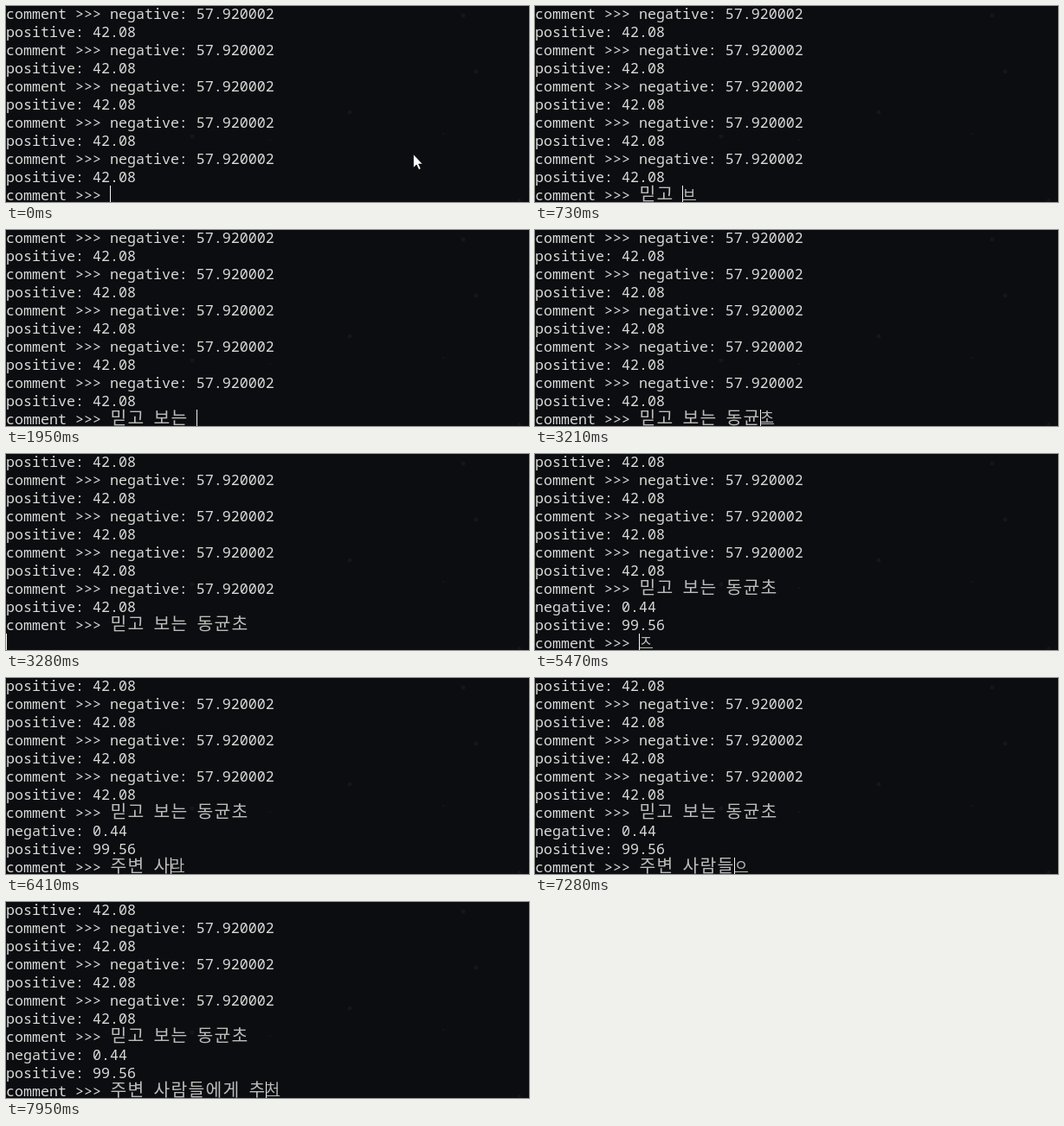
Write an HTML page that moves like this. It is 604 px wide and 227 px high and loops after 8 s.

```html
<!DOCTYPE html>
<html lang="ko">
<head>
<meta charset="utf-8">
<title>Terminal</title>
<style>
  html, body { margin: 0; width: 100%; height: 100%; overflow: hidden; background: #0c0d11; }
  svg { display: block; }
  text { white-space: pre; }
  .mono { font: 500 16.667px "Noto Sans Mono", "DejaVu Sans Mono", monospace; fill: #dadad8; }
  .wide, .draft { font-family: "Noto Sans CJK KR", "Noto Sans CJK", sans-serif; font-weight: 300; text-anchor: middle; fill: #bcbcba; }
  .wide { font-size: 20.4px; }
  .draft { font-size: 17.4px; }
</style>
</head>
<body>
<svg width="604" height="227" viewBox="0 0 604 227">
  <rect width="604" height="227" fill="#0c0d11"/>
  <rect y="226" width="604" height="1" fill="#190a19"/>
  <g id="specks" fill="#15161a"></g>
  <g id="rows"></g>
  <g id="input"></g>
  <rect id="caret" y="208" width="1" height="19" fill="#f4f4f4"/>
  <path id="mouse" d="M470.5 171.7v15.6l3.6-3.4 2.7 5.6 2.3-1.1-2.6-5.4h4.6z" fill="#fff" stroke="#000" stroke-width=".6"/>
</svg>
<script>
const LOOP = 8000, CELL = 10, LINE = 21, BASE = 15;
const PROMPT = 'comment >>> ', OLD = PROMPT + 'negative: 57.920002', POS = 'positive: 42.08';
const REVIEW = '믿고 보는 동균초';
const $ = id => document.getElementById(id);
const isWide = c => c > '\u1100';
const cols = s => [...s].reduce((n, c) => n + (isWide(c) ? 2 : 1), 0);

function add(parent, name, attrs, content = '') {
  const el = document.createElementNS('http://www.w3.org/2000/svg', name);
  for (const k in attrs) el.setAttribute(k, attrs[k]);
  el.textContent = content;
  parent.append(el);
}

// Lays a line on the character grid; Hangul takes two cells.
function put(parent, str, row, col = 0) {
  const y = BASE + row * LINE;
  for (const run of str.match(/[\u1100-\uffff]|[^\u1100-\uffff]+/g) || []) {
    if (isWide(run)) add(parent, 'text', { class: 'wide', x: (col + 1) * CELL, y: y - 0.5 }, run);
    else add(parent, 'text', { class: 'mono', x: col * CELL, y }, run);
    col += cols(run);
  }
}

const pairs = (n, a, b) => Array.from({ length: n }, (_, i) => i % 2 ? b : a);
const SCREENS = {
  first: pairs(10, OLD, POS),
  sent: [...pairs(9, POS, OLD), PROMPT + REVIEW],
  result: [...pairs(7, POS, OLD), PROMPT + REVIEW, 'negative: 0.44', 'positive: 99.56']
};

// Each step is "committed|composing", spread evenly from start to end.
const states = [{ t: 0, screen: 'first', prompt: PROMPT, typed: '|', mouse: true }];
function type(screen, start, end, steps, prompt = PROMPT) {
  steps.forEach((typed, i) => states.push({
    t: start + (end - start) * i / Math.max(1, steps.length - 1), screen, prompt, typed
  }));
}
type('first', 70, 860, ['|', '|ㅁ', '|미', '|믿', '믿|ㄱ', '믿|고', '믿고 |', '믿고 |ㅂ', '믿고 |보', '믿고 |본']);
type('first', 930, 1000, ['믿고 보|느', '믿고 보는 |']);
type('first', 1140, 1950, ['믿고 보는 |ㄷ', '믿고 보는 |']);
type('first', 2550, 2890, ['믿고 보는 |ㄷ', '믿고 보는 |도', '믿고 보는 |동', '믿고 보는 동|ㄱ', '믿고 보는 동|규']);
type('first', 3080, 3210, ['믿고 보는 동|균', '믿고 보는 동균|ㅊ', '믿고 보는 동균|초']);
type('sent', 3280, 3280, ['|'], '');
type('result', 4210, 4210, ['|'], '');
type('result', 4280, 4280, ['|']);
type('result', 5470, 5870, ['|ㅈ', '|주', '|줍', '주|벼', '주|변']);
type('result', 6010, 6410, ['주변 |', '주변 |ㅅ', '주변 |사', '주변 |살', '주변 사|라']);
type('result', 6870, 7480, ['주변 사|람', '주변 사람|ㄷ', '주변 사람|드', '주변 사람|들',
  '주변 사람들|ㅇ', '주변 사람들|에', '주변 사람들에|게', '주변 사람들에게 |']);
type('result', 7680, 7680, ['주변 사람들에게 |ㅊ']);
type('result', 7820, 7950, ['주변 사람들에게 |추', '주변 사람들에게 |춫', '주변 사람들에게 추|처']);

function show(s) {
  const rows = $('rows'), input = $('input');
  rows.replaceChildren();
  input.replaceChildren();
  SCREENS[s.screen].forEach((line, i) => put(rows, line, i));

  const [done, draft] = s.typed.split('|');
  put(input, s.prompt + done, 10);
  const x = cols(s.prompt + done) * CELL;
  if (draft) {
    add(input, 'text', { class: 'draft', x: x + 8, y: 223 }, draft);
    add(input, 'rect', { x, y: 224, width: 16, height: 1, fill: '#bcbcba' });
  }
  $('caret').setAttribute('x', x);
  $('mouse').style.display = s.mouse ? '' : 'none';
}

for (const [cx, cy, r] of [[528, 11, 2.5], [543, 76, 2.5], [397, 123, 2.5], [215, 151, 2.5], [305, 155, 1.2], [505, 148, 1.2], [593, 225, 2]])
  add($('specks'), 'circle', { cx, cy, r });

let current;
const begin = performance.now();
function frame() {
  const t = (performance.now() - begin) % LOOP;
  const next = states.findLast(s => s.t <= t) || states[0];
  if (next !== current) show(current = next);
  requestAnimationFrame(frame);
}
frame();
</script>
</body>
</html>
```
